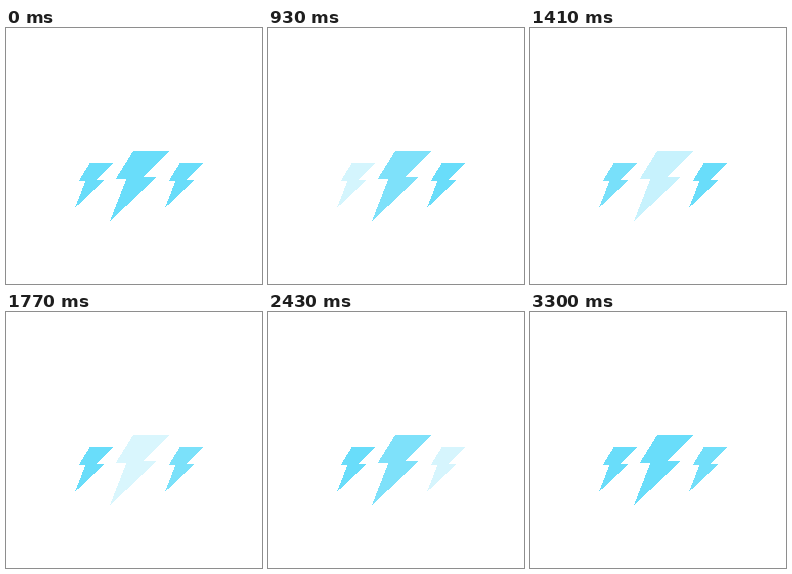
These frames come from a looping animation (256 px wide and 256 px high, 4.5 s). An HTML page without scripts:

```html
<!DOCTYPE html>
<html lang="en">
<head>
<meta charset="utf-8">
<title>Lightning loader</title>
<style>
  html, body { margin: 0; width: 100%; height: 100%; overflow: hidden; background: #fff; }
  svg { display: block; width: 100%; height: 100%; fill: #69ddfa; shape-rendering: crispEdges; }
  .bolt { animation: 4.5s step-end infinite; }
  .left { animation-name: left; }
  .middle { animation-name: middle; }
  .right { animation-name: right; }

  /* Each bolt dims in even steps, rests at its palest, then brightens. */
  @keyframes left {
    0% { opacity: 1; animation-timing-function: steps(6); }
    16% { opacity: .25; }
    20.666% { opacity: .28; animation-timing-function: steps(4); }
    31.333% { opacity: .9; }
    34%, 100% { opacity: 1; }
  }
  @keyframes middle {
    0% { opacity: 1; }
    20.666% { opacity: .86; animation-timing-function: steps(5); }
    34% { opacity: .25; }
    42.666% { opacity: .43; }
    45.333% { opacity: .53; }
    48.666% { opacity: .66; animation-timing-function: steps(2); }
    54% { opacity: .86; }
    56.666%, 100% { opacity: 1; }
  }
  @keyframes right {
    0% { opacity: 1; }
    39.333% { opacity: .88; }
    42.666% { opacity: .75; }
    45.333% { opacity: .64; }
    48.666% { opacity: .5; animation-timing-function: steps(2); }
    54% { opacity: .27; }
    56.666% { opacity: .2; }
    60.666% { opacity: .4; animation-timing-function: steps(4); }
    71.333%, 100% { opacity: .94; }
  }
</style>
</head>
<body>
<svg viewBox="0 0 256 256">
  <defs>
    <path id="bolt" d="M23 0H60L33.5 26H47L0 70L16.5 27.5H6Z"/>
  </defs>
  <g class="bolt left"><use href="#bolt" transform="translate(69 135) scale(.64)"/></g>
  <g class="bolt middle"><use href="#bolt" transform="translate(104 123)"/></g>
  <g class="bolt right"><use href="#bolt" transform="translate(159 135) scale(.64)"/></g>
</svg>
</body>
</html>
```
